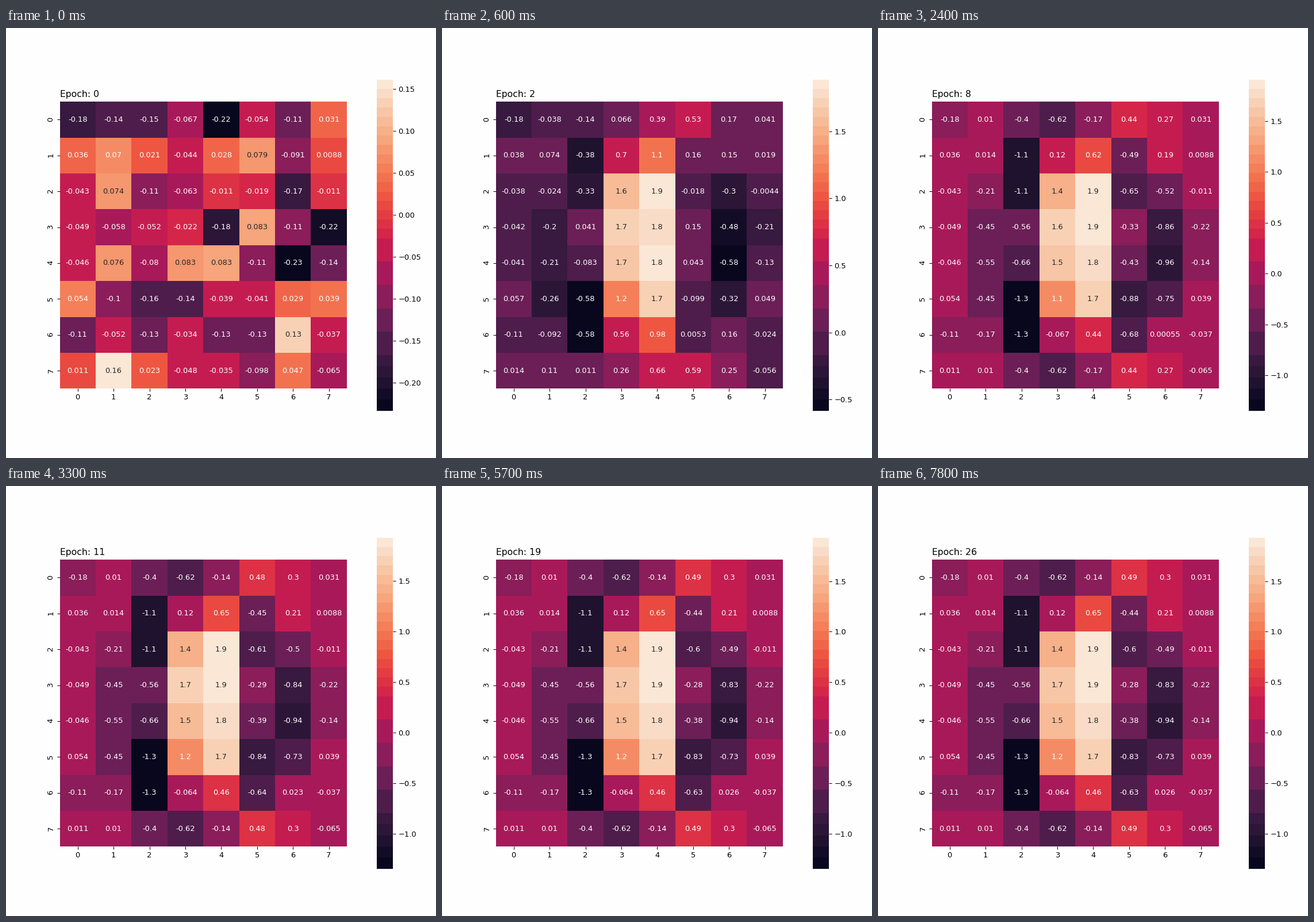
Recreate the animation shown at these times as a matplotlib script. Size 748 by 748 pixels, loop 8 s.

```python
import matplotlib.pyplot as plt
import numpy as np
from matplotlib.animation import FuncAnimation
from matplotlib.colors import LinearSegmentedColormap

N = 8
INTERVAL, FRAMES, FRAMES_PER_EPOCH = 100, 80, 3
FORMED_EPOCH, SETTLE_EPOCHS = 4, 7.5

plt.rcParams["font.family"] = "DejaVu Sans"

ramp = LinearSegmentedColormap.from_list("ramp", [
    "#03051a", "#221331", "#451c47", "#6a1f56", "#921c5b", "#b91657",
    "#d92847", "#ed513e", "#f47c56", "#f6a47b", "#f7c9aa", "#faebdd"])

# Colour bands: broad in the purples, narrow towards both ends.
edges = np.interp(np.arange(28), [0, 5, 10, 27], [0, .168, .521, 1])
centers = (edges[:-1] + edges[1:]) / 2

row, col = np.mgrid[:N, :N]
mid = (N - 1) / 2


def initial_weights():
    noise = np.random.default_rng(8).normal(size=(N, N))
    return np.interp(noise, [noise.min(), noise.max()], [-.2337, .1608])


def ridge():
    """Upright bright stroke, slightly bent and weaker at the top."""
    height = np.interp(row, [0, 1.5, 7], [1.35, 2.1, 1.8])
    center = 3.65 + .2 * np.cos(2 * np.pi * row / 6)
    return height * np.exp(-((col - center) / 1.55) ** 2)


def settled_weights(noise):
    """Bright bar between dark flanks, nearly mirrored top to bottom."""
    # Each column's values from the middle rows outwards.
    profiles = [
        [-.5, -.33, -.08, .01],
        [-.61, -1.23, -1.2, -.4],
        [1.6, 1.27, .03, -.62],
        [1.88, 1.815, .555, -.14],
        [-.33, -.715, -.535, .49],
        [-.885, -.61, .12, .3],
    ]
    lean = -.12 * np.sin(2 * np.pi * (np.arange(N) - mid) / (N - 1))
    grid = noise.copy()
    for column, profile in enumerate(profiles, 1):
        grid[:, column] = profile[::-1] + profile + lean
    return grid


initial = initial_weights()
first = initial + ridge()
settled = settled_weights(initial)
drift = .11 * np.exp(-((col - 5) / 1.2) ** 2) * (col < N - 1)


def weights(epoch):
    if epoch == 0:
        return initial
    if epoch <= FORMED_EPOCH:
        left = (FORMED_EPOCH - epoch) / (FORMED_EPOCH - 1)
        formed = settled - drift
        return formed + (first - formed) * left ** 2
    remaining = max(0, 1 - (epoch - FORMED_EPOCH) / SETTLE_EPOCHS)
    return settled - drift * remaining


def text_color(level):
    rgb = np.array(ramp(level)[:3])
    linear = np.where(rgb <= .03928, rgb / 12.92, ((rgb + .055) / 1.055) ** 2.4)
    return ".15" if linear @ [.2126, .7152, .0722] > .408 else "w"


fig, (heat, bar) = plt.subplots(
    1, 2, figsize=(8, 8), dpi=93.5, facecolor="#fefefe",
    gridspec_kw=dict(width_ratios=(.9, .05), wspace=.2))

heat.set(xlim=(0, N), ylim=(N, 0), aspect="equal")
heat.set_xticks(np.arange(N) + .5, range(N))
heat.set_yticks(np.arange(N) + .5, range(N), rotation=90)
cells = heat.pcolormesh(np.arange(N + 1), np.arange(N + 1), initial,
                        cmap=ramp, vmin=0, vmax=1)
labels = [heat.text(x + .5, y + .5, "", ha="center", va="center")
          for y, x in zip(row.flat, col.flat)]
title = heat.set_title("", loc="left")

bar.pcolormesh([0, 1], edges, centers[:, None], cmap=ramp, vmin=0, vmax=1,
               transform=bar.transAxes)
bar.set(xlim=(0, 1), xticks=[])
bar.yaxis.tick_right()

for ax in (heat, bar):
    ax.spines[:].set_visible(False)


def update(frame):
    epoch = frame // FRAMES_PER_EPOCH
    values = weights(epoch)
    low, high = values.min(), values.max()
    levels = (values - low) / (high - low)
    cells.set_array(centers[np.digitize(levels, edges[1:-1])])
    for label, value, level in zip(labels, values.flat, levels.flat):
        label.set_text(f"{value:.2g}")
        label.set_color(text_color(level))
    title.set_text(f"Epoch: {epoch}")
    bar.set_ylim(low, high)
    return [cells, title, *labels]


anim = FuncAnimation(fig, update, frames=FRAMES, interval=INTERVAL,
                     init_func=lambda: update(0), repeat=True, repeat_delay=0)
plt.show()
```
